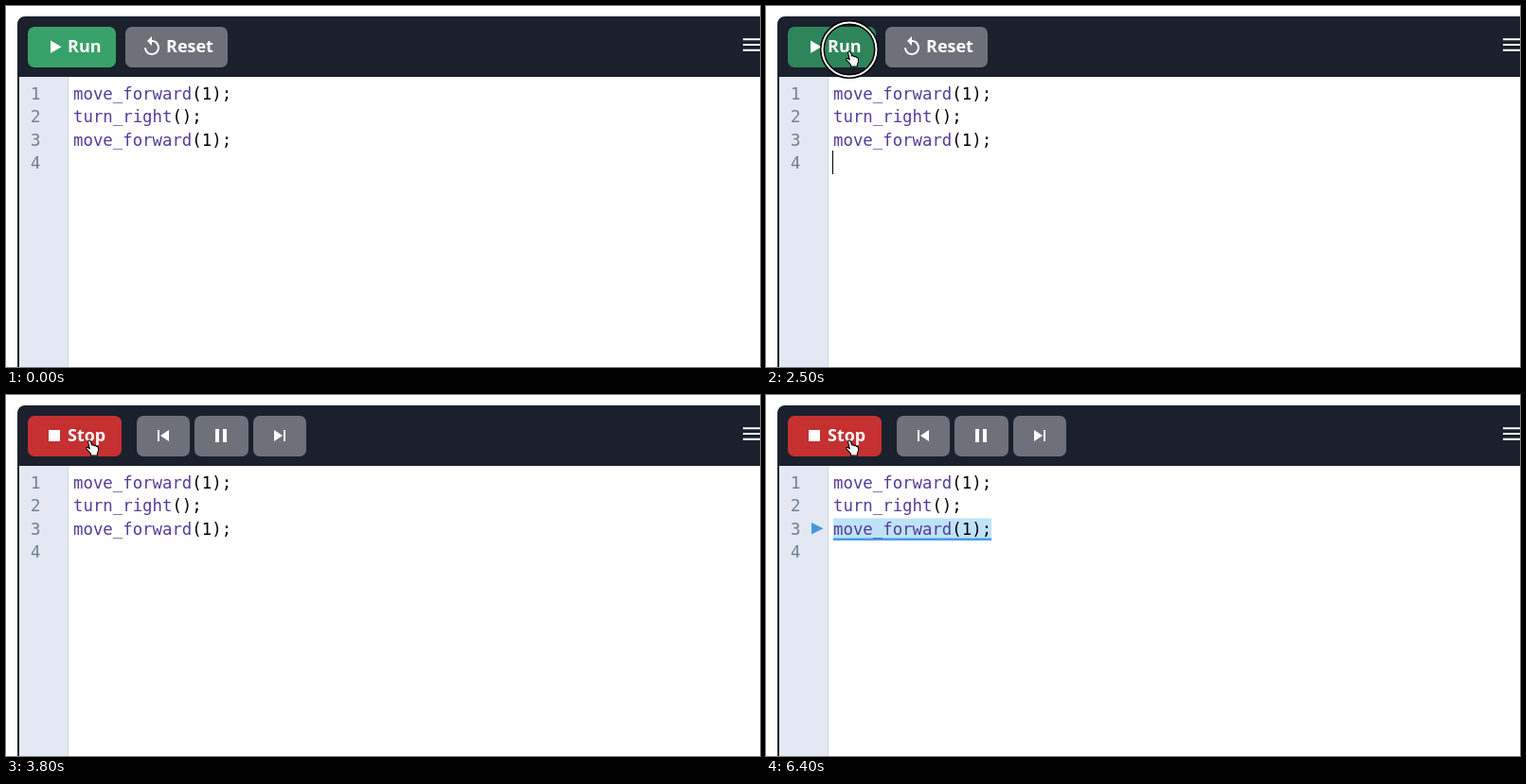
These frames come from a looping animation (796 px wide and 382 px high, 6500 ms). An HTML page:

```html
<!DOCTYPE html>
<html lang="en">
<head>
<meta charset="utf-8">
<title>Code editor run</title>
<style>
  html, body { margin: 0; width: 100%; height: 100%; overflow: hidden; background: #fff; }
  svg { display: block; width: 100vw; height: 100vh; }
  text { white-space: pre; }
  .label { font: 700 18px "Open Sans", "Noto Sans", sans-serif; fill: #fff; }
  .code { font: 17.35px "DejaVu Sans Mono", monospace; }
  .icon { fill: #fff; }
  .gray { fill: #6e7179; }
</style>
</head>
<body>
<svg viewBox="0 0 796 382">
  <rect width="796" height="382" fill="#fff"/>
  <path d="M12 382V19a8 8 0 0 1 8-8H796V75H14V382Z" fill="#1a202c"/>
  <rect x="14" y="75" width="51" height="307" fill="#e3e8f2"/>
  <rect x="65" y="75" width="1" height="307" fill="#cfd3e2"/>
  <path d="M778 35.2h18M778 41h18M778 46.8h18" stroke="#fff" stroke-width="2"/>

  <g id="idle">
    <rect id="run" x="23" y="22" width="93" height="43" rx="7"/>
    <path class="icon" d="M47 36.5L58.5 43.2 47 50Z"/>
    <text class="label" x="65" y="49">Run</text>
    <rect class="gray" x="126" y="22" width="108" height="43" rx="7"/>
    <path class="icon" transform="translate(142 31)" d="M12 5V1L7 6l5 5V7c3.31 0 6 2.69 6 6s-2.69 6-6 6-6-2.69-6-6H4c0 4.42 3.58 8 8 8s8-3.58 8-8-3.58-8-8-8z"/>
    <text class="label" x="169" y="49">Reset</text>
  </g>

  <g id="running">
    <rect id="stop" x="23" y="22" width="99" height="43" rx="7"/>
    <rect class="icon" x="45" y="37" width="12" height="12"/>
    <text class="label" x="65" y="49">Stop</text>
    <rect class="gray" x="138" y="22" width="56" height="43" rx="7"/>
    <rect class="gray" x="199" y="22" width="57" height="43" rx="7"/>
    <rect class="gray" x="261" y="22" width="56" height="43" rx="7"/>
    <path class="icon" d="M160 37h2v12h-2zM172 37v12l-9-6zM221 36h4v14h-4zM229 36h4v14h-4zM283 37v12l9-6zM293 37h2v12h-2z"/>
  </g>

  <g id="marker">
    <rect x="71" y="82" width="167" height="21.4" id="highlight" fill="#bee3f8"/>
    <rect x="71" y="103" width="167" height="2.4" id="underline" fill="#4299e1"/>
    <path d="M48 86.5L60.5 92.7 48 99Z" fill="#4299e1"/>
  </g>
  <g id="lines"></g>
  <rect id="caret" x="70" y="153" width="1" height="25" fill="#000"/>

  <g id="ring" fill="none">
    <circle r="28.5" stroke="#000" stroke-width="5"/>
    <circle r="28.5" stroke="#fff" stroke-width="2"/>
  </g>
  <g id="beam" fill="none">
    <path id="beamShape" d="M-3.5 -8.5Q0 -8.5 0 -6Q0 -8.5 3.5 -8.5M0 -6V6M-3.5 8.5Q0 8.5 0 6Q0 8.5 3.5 8.5M-2 2.5H2" stroke="#fff" stroke-width="2.6"/>
    <use href="#beamShape" style="stroke:#000"/>
  </g>
  <path id="hand" fill="#fff" stroke="#000" stroke-width="1.1" stroke-linejoin="round"
    d="M-4.5 -7Q-3 -9 -1.6 -7L-0.3 -3Q1.2 -4 2.2 -2.3Q3.6 -3.2 4.5 -1.5Q6.2 -1.8 6.5 .2Q7 3.5 5.4 5.5V8H-1.5V6.2L-6 1.2Q-6.8 -.8 -4.6 -.6L-2.7 1Z"/>
</svg>
<script>
const LOOP = 6500;
const $ = id => document.getElementById(id);
const show = (id, on) => $(id).setAttribute("visibility", on ? "visible" : "hidden");
const clamp = v => Math.max(0, Math.min(1, v));
const mix = (a, b, p) => a + (b - a) * p;
const mixColor = (a, b, p) => `rgb(${a.map((v, i) => Math.round(mix(v, b[i], p)))})`;

const PITCH = 24.25;
const CODE = [["move_forward", "(1);"], ["turn_right", "();"], ["move_forward", "(1);"], ["", ""]];
$("lines").innerHTML = CODE.map(([name, rest], i) => {
  const y = 99 + i * PITCH;
  return `<text class="code" x="26" y="${y}" fill="#718096">${i + 1}</text>
    <text class="code" x="71" y="${y}"><tspan fill="#553c9a">${name}</tspan>${rest}</text>`;
}).join("");

// Pointer path: time, x, y
const PATH = [[400, 210, 321], [700, 150, 216], [1000, 106, 124], [1100, 102, 107],
  [1400, 93, 65], [1700, 91, 57], [2100, 91, 56]];
const CARET_TOGGLES = [100, 600, 1200, 1700, 2100, 2700];
const STEPS = [4000, 5100, 6100];

function pointerAt(t) {
  const next = PATH.findIndex(p => p[0] > t);
  if (next < 0) return PATH.at(-1).slice(1);
  const a = PATH[Math.max(0, next - 1)], b = PATH[next];
  const p = clamp((t - a[0]) / (b[0] - a[0]));
  return [mix(a[1], b[1], p), mix(a[2], b[2], p)];
}

function draw(t) {
  const running = t >= 3100;
  show("idle", !running);
  show("running", running);
  $("run").setAttribute("fill", mixColor([56, 161, 105], [47, 133, 90], clamp((t - 1300) / 200)));
  $("stop").setAttribute("fill", mixColor([229, 62, 62], [197, 48, 48], clamp((t - 3100) / 300)));

  const passed = CARET_TOGGLES.filter(time => time <= t).length;
  show("caret", passed % 2 === 1);

  const line = STEPS.filter(time => time <= t).length - 1;
  show("marker", line >= 0);
  if (line >= 0) {
    const width = CODE[line].join("").length * 10.445;
    $("marker").setAttribute("transform", `translate(0 ${line * PITCH})`);
    $("highlight").setAttribute("width", width);
    $("underline").setAttribute("width", width);
  }

  const [x, y] = pointerAt(t);
  const overButton = y < 70;
  show("beam", t >= 400 && !overButton);
  show("hand", overButton);
  $("beam").setAttribute("transform", `translate(${x} ${y})`);
  $("hand").setAttribute("transform", `translate(${x} ${y})`);

  show("ring", t >= 2400 && t < 2900);
  $("ring").setAttribute("transform", `translate(88 46) scale(${t < 2500 ? 0.8 : 1})`);
}

const start = performance.now();
function tick() {
  const elapsed = (performance.now() - start) % LOOP;
  draw(Math.floor(elapsed / 100) * 100);
  requestAnimationFrame(tick);
}
tick();
</script>
</body>
</html>
```
